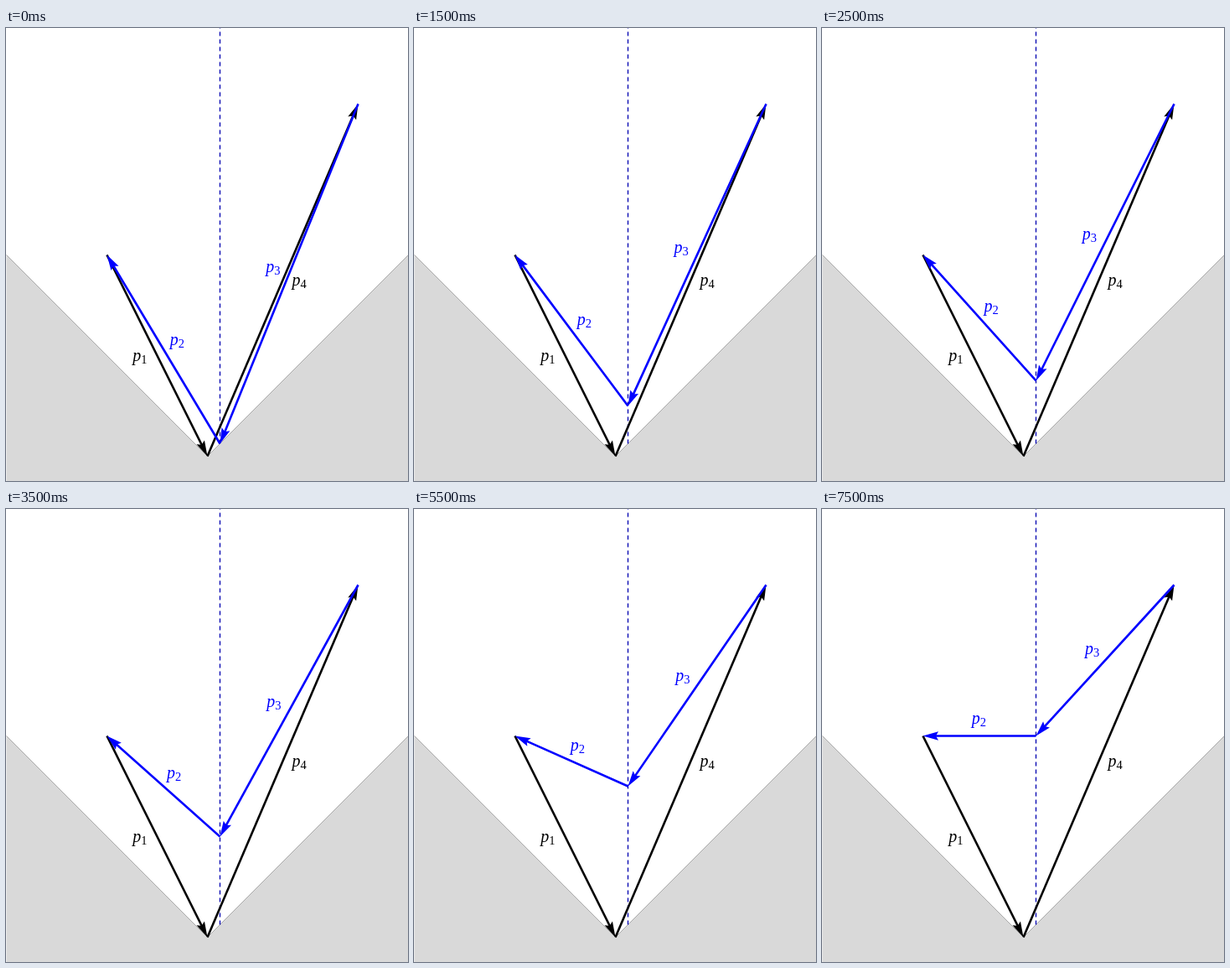
Write an HTML page that moves like this. It is 480 by 540 pixels and loops after 8000 ms.

```html
<!DOCTYPE html>
<html lang="en">
<head>
<meta charset="utf-8">
<title>Moving vertex</title>
<style>
  html, body { margin: 0; width: 100%; height: 100%; overflow: hidden; background: #fff; }
  svg { display: block; width: 480px; height: 540px; }
  text { font: italic 20px "Liberation Serif", Times, serif; }
  text .sub { font-size: 14.5px; font-style: normal; }
</style>
</head>
<body>
<svg id="stage" viewBox="0 0 480 540">
  <path d="M.5 270.5L240.5 510.5L480.5 270.5V540H.5Z" fill="#d9d9d9"/>
  <path d="M.5 270.5L240.5 510.5L480.5 270.5" fill="none" stroke="#999" stroke-width=".8"/>
  <path d="M255.5 495.5V0" stroke="#0000b0" stroke-width="1.3" stroke-dasharray="5 4"/>
</svg>
<script>
const stage = document.getElementById('stage');
const LEFT = [120.5, 270.5], BOTTOM = [240.5, 510.5], RIGHT = [420.5, 90.5];
const BLUE = '#00f', STEP = 500, LOOP = 8000, LABEL_GAP = 20;

function add(tag, attrs, parent = stage) {
  const el = document.createElementNS('http://www.w3.org/2000/svg', tag);
  for (const key in attrs) el.setAttribute(key, attrs[key]);
  return parent.appendChild(el);
}

function makeArrow(color) {
  const g = add('g', { fill: color });
  const shaft = add('path', { stroke: color, 'stroke-width': 2.6 }, g);
  add('path', { d: 'M0 0L-18.5 5.3L-15.5 0L-18.5 -5.3Z' }, g);
  return (from, to) => {
    const dx = to[0] - from[0], dy = to[1] - from[1];
    const angle = Math.atan2(dy, dx) * 180 / Math.PI;
    g.setAttribute('transform', `translate(${to}) rotate(${angle})`);
    shaft.setAttribute('d', `M${-Math.hypot(dx, dy)} 0H-12`);
  };
}

// The returned function places the label by the centre of its ink.
function makeLabel(index, color) {
  const text = add('text', { fill: color });
  add('tspan', { x: -8, y: 3 }, text).textContent = 'p';
  add('tspan', { x: 2, y: 6, class: 'sub' }, text).textContent = index;
  return (x, y) => text.setAttribute('transform', `translate(${x} ${y})`);
}

// Centre of a label set off sideways from the middle of a segment.
function beside(from, to) {
  const dx = to[0] - from[0], dy = to[1] - from[1], k = LABEL_GAP / Math.hypot(dx, dy);
  return [(from[0] + to[0]) / 2 - dy * k - 1.3, (from[1] + to[1]) / 2 + dx * k + 2.6];
}

makeArrow('#000')(LEFT, BOTTOM);
makeArrow('#000')(BOTTOM, RIGHT);
makeLabel(1, '#000')(159.3, 394);
makeLabel(4, '#000')(349.5, 303.7);
const arrow2 = makeArrow(BLUE), arrow3 = makeArrow(BLUE);
const label2 = makeLabel(2, BLUE), label3 = makeLabel(3, BLUE);

function draw(ms) {
  const vertex = [255.5, 495.5 - 15 * Math.floor(ms % LOOP / STEP)];
  arrow2(vertex, LEFT);
  arrow3(RIGHT, vertex);
  label2(...beside(LEFT, vertex).map((v, i, p) => v));
  label3(...beside(vertex, RIGHT));
}

// Both labels lie above their segments.
function beside(from, to) {
  const dx = to[0] - from[0], dy = to[1] - from[1], k = LABEL_GAP / Math.hypot(dx, dy);
  return [(from[0] + to[0]) / 2 + dy * k - 1.3, (from[1] + to[1]) / 2 - dx * k + 2.6];
}

const start = performance.now();
function tick() {
  draw(performance.now() - start);
  requestAnimationFrame(tick);
}
tick();
</script>
</body>
</html>
```
